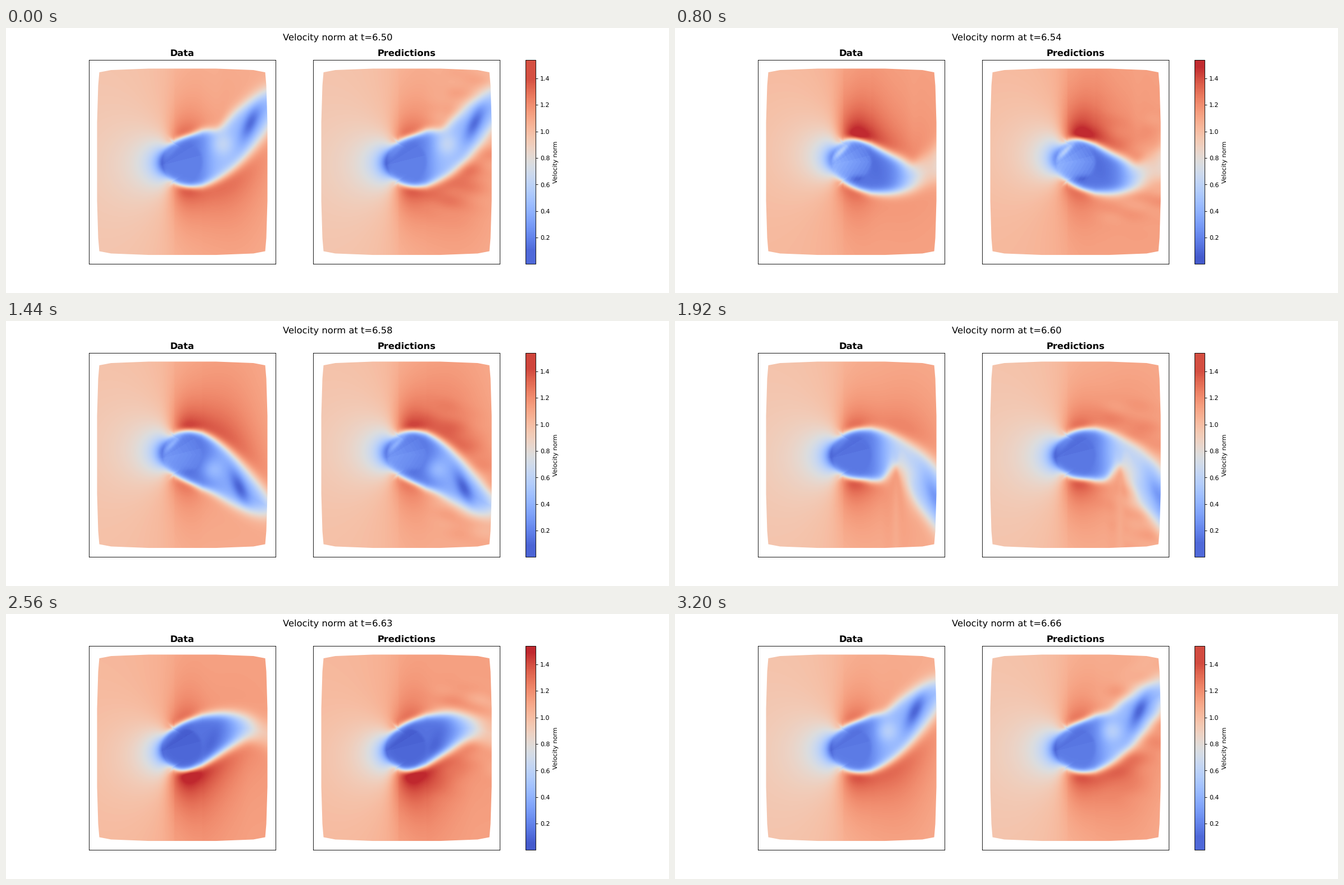
These frames come from a looping animation (1183x473 px, 3360 ms). A matplotlib script:

```python
import numpy as np
import matplotlib.pyplot as plt
from matplotlib.animation import FuncAnimation
from matplotlib.colors import ListedColormap
from matplotlib.patches import Polygon

W, H, DPI = 1183, 473, 80
FRAMES, INTERVAL = 21, 160
PERIOD = 20.5              # vortex shedding period in frames
HALF = PERIOD / 2
VMIN, VMAX = 0.0014, 1.5395
CX, CY, R = 318, 239, 39   # cylinder, in stage pixels

X0, X1, Y0, Y1 = 162, 468, 72, 406
xs = np.arange(X0, X1) + 0.5
ys = np.arange(Y0, Y1) + 0.5
px, py = np.meshgrid(xs, ys)
X, Y = px - CX, CY - py
r = np.hypot(X, Y)


def sig(v):
    return 1 / (1 + np.exp(-np.clip(v, -40, 40)))


def bump(v, width):
    return np.exp(-(v / width) ** 2)


def phase(n, peak, period=PERIOD):
    return 2 * np.pi * (n - peak) / period


def wave(n, peak, period=PERIOD):
    return np.cos(phase(n, peak, period))


def edge(n):
    """Height of the upper wake edge; the lower one mirrors it half a period later."""
    run = np.maximum(xs - 300, 0)
    mean = 47 - 11 * np.exp(-run / 15) - 0.13 * np.maximum(run - 50, 0)
    a = phase(n, 15.6 + 0.028 * run)
    sway = 95 * (run / 170) ** 1.6 * (np.cos(a) + 0.25 * np.sin(2 * a))
    # pocket of fast fluid folded into the wake
    age = (n - 2.4 + HALF) % PERIOD - HALF
    pocket = 44 * bump(xs - 403 - 9 * age, 19) * bump(age, 2)
    return mean + sway - pocket


def layer(n, dist):
    """Fast fluid above the wake: a fixed shoulder and a part swept downstream."""
    d = np.maximum(dist, 0)
    shoulder = 0.22 * bump(px - 315, 36) * np.exp(-d / 45)
    mid = 375 + 40 * np.sin(phase(n, 8))
    swept = (0.21 + 0.2 * wave(n, 7.5)) * bump(px - mid, 88) * np.exp(-d / 62)
    return shoulder + swept


def body_speed(n):
    g = wave(n, 5.5)
    up = max(g, 0)
    chevron = np.floor((X + 0.6 * np.abs(Y)) / 7) * 7
    v = 0.18 + 0.1 * g - 0.003 * up * chevron
    # bright streak along the front shoulder
    across, along = (X - Y + 41) * 0.71, (X + Y + 1) * 0.71
    v = v + (0.05 + 0.22 * up) * bump(across, 5) * bump(along, 20)
    v = v - 0.15 * up * bump(X - 8, 16) * bump(Y + 32, 8)
    # flat facets fanning out from the nose
    fan = np.arctan2(Y + 6, X + 40)
    return v + 0.02 * (fan < 0.25) - 0.02 * (fan > 0.55)


def wake_speed(n):
    dark_end = 380 + 20 * wave(n, 5.5, HALF)
    v = 0.14 + 0.23 * sig((px - dark_end) / 10)
    age = (n + 4) % HALF - 4
    for a in (age, age + HALF):
        v = v + np.clip(0.1 + 0.08 * a, 0, 0.55) * bump(px - 385 - 14 * a, 38)
    # dark vortex cores, each followed by a lighter patch
    for shift, side in ((0, 1), (HALF, -1)):
        a = (n + shift) % PERIOD
        sx = 371 + 15.3 * (a - 6)
        sy = -37.5 * (1 + np.tanh((a - 7.7) / 2))
        amp = 0.3 * bump(a - 9.5, 2.8)
        dx, dy = px - sx, side * Y - sy
        along, across = 0.4 * dx - 0.92 * dy, 0.92 * dx + 0.4 * dy
        v = v - amp * bump(along, 32) * bump(across, 12)
        v = v + 0.6 * amp * bump(dx + 50, 19) * bump(side * Y - 0.45 * sy, 19)
    return np.maximum(v, 0.06)


def field(n):
    """Speed at every pixel and the distance to the slow region."""
    top, low = edge(n), -edge(n + HALF)
    d_top = (Y - top) / np.hypot(1, np.gradient(top))
    d_low = (low - Y) / np.hypot(1, np.gradient(low))

    # stagnation in front of the cylinder, slight speed-up at its sides
    angle = np.arctan2(Y, -X) + 0.25 * wave(n, 16.3)
    near = R / np.maximum(r, R)
    slow = near ** 2 * np.maximum(np.cos(angle), 0) ** 2
    side = 0.16 * near ** 4 * np.sin(angle) ** 2
    upper = sig((Y - (top + low) / 2) / 8)
    fast = upper * layer(n, d_top) + (1 - upper) * layer(n + HALF, d_low)
    outer = (1 + 0.03 * wave(n, -4.4, HALF) - slow + side
             + 0.09 * sig((px - 290) / 25) + fast * sig((px - 286) / 7))

    in_body = np.maximum(sig((36 - np.hypot(X + 4, Y)) / 1.5), sig((325 - px) / 6))
    inner = wake_speed(n)
    inner = inner + (body_speed(n) - inner) * in_body

    wake = np.maximum(np.maximum(d_top, d_low), 298 - px)
    dist = np.minimum(r - R, wake)
    width = 3 + 0.035 * np.maximum(px - 330, 0)
    return inner + (outer - inner) * sig(dist / width), dist


rng = np.random.default_rng(4)
RIPPLES = [(rng.uniform(.02, .08), rng.uniform(-.2, .2), rng.uniform(0, 6.28))
           for _ in range(9)]


def ripple(n, dist):
    """Faint uneven streaks drifting downstream in the predicted flow."""
    v = sum(np.sin(kx * (X - 15 * n) + ky * Y + ph) for kx, ky, ph in RIPPLES)
    return 0.011 * v * bump(dist - 20, 38) * sig((px - 365) / 14)


def clamped_map(n):
    """Colour map whose two ends flatten out, more or less with the phase."""
    swing = wave(n, -4.4, HALF)
    levels = np.clip(np.linspace(VMIN, VMAX, 256), 0.08 - 0.03 * swing,
                     1.44 + 0.05 * swing)
    return ListedColormap(plt.cm.coolwarm((levels - VMIN) / (VMAX - VMIN)))


def outline():
    corner = np.array([(60, 166.3), (127, 163.7), (148, 159.7), (150, 136), (152, 70)])
    half = np.vstack([corner, corner[::-1] * (1, -1)])
    return np.vstack([half, half[::-1] * (-1, 1)]) + (314.5, 238.75)


BIG, SMALL = 14.79, 9.86
plt.rcParams.update({"font.size": SMALL, "text.hinting": "none"})
fig, axes = plt.subplots(1, 2, figsize=(W / DPI, H / DPI), dpi=DPI)


def add_panel(ax, title):
    im = ax.imshow(np.ones_like(X), vmin=VMIN, vmax=VMAX, cmap="coolwarm",
                   extent=(X0, X1, Y1, Y0), aspect="auto", interpolation="bilinear")
    ax.set(xticks=[], yticks=[])
    ax.set_title(title, fontsize=BIG, fontweight="bold")
    return im


images = [add_panel(ax, name) for ax, name in zip(axes, ("Data", "Predictions"))]
bar = fig.colorbar(images[0], ax=axes, label="Velocity norm")
heading = fig.suptitle("", fontsize=BIG)

# both panels use the stage pixels of the left one
box = axes[0].get_position()
for ax, im in zip(axes, images):
    ax.set(xlim=(box.x0 * W, box.x1 * W), ylim=((1 - box.y0) * H, (1 - box.y1) * H))
    im.set_clip_path(Polygon(outline(), closed=True, transform=ax.transData))


def draw(n):
    speed, dist = field(n)
    cmap = clamped_map(n)
    for im, values in zip(images, (speed, speed + ripple(n, dist))):
        im.set_data(values)
        im.set_cmap(cmap)
    heading.set_text(f"Velocity norm at t={6.504 + 0.008 * n:.2f}")
    return [*images, heading]


anim = FuncAnimation(fig, draw, frames=FRAMES, interval=INTERVAL,
                     repeat=True, repeat_delay=0, blit=False)
plt.show()
```
